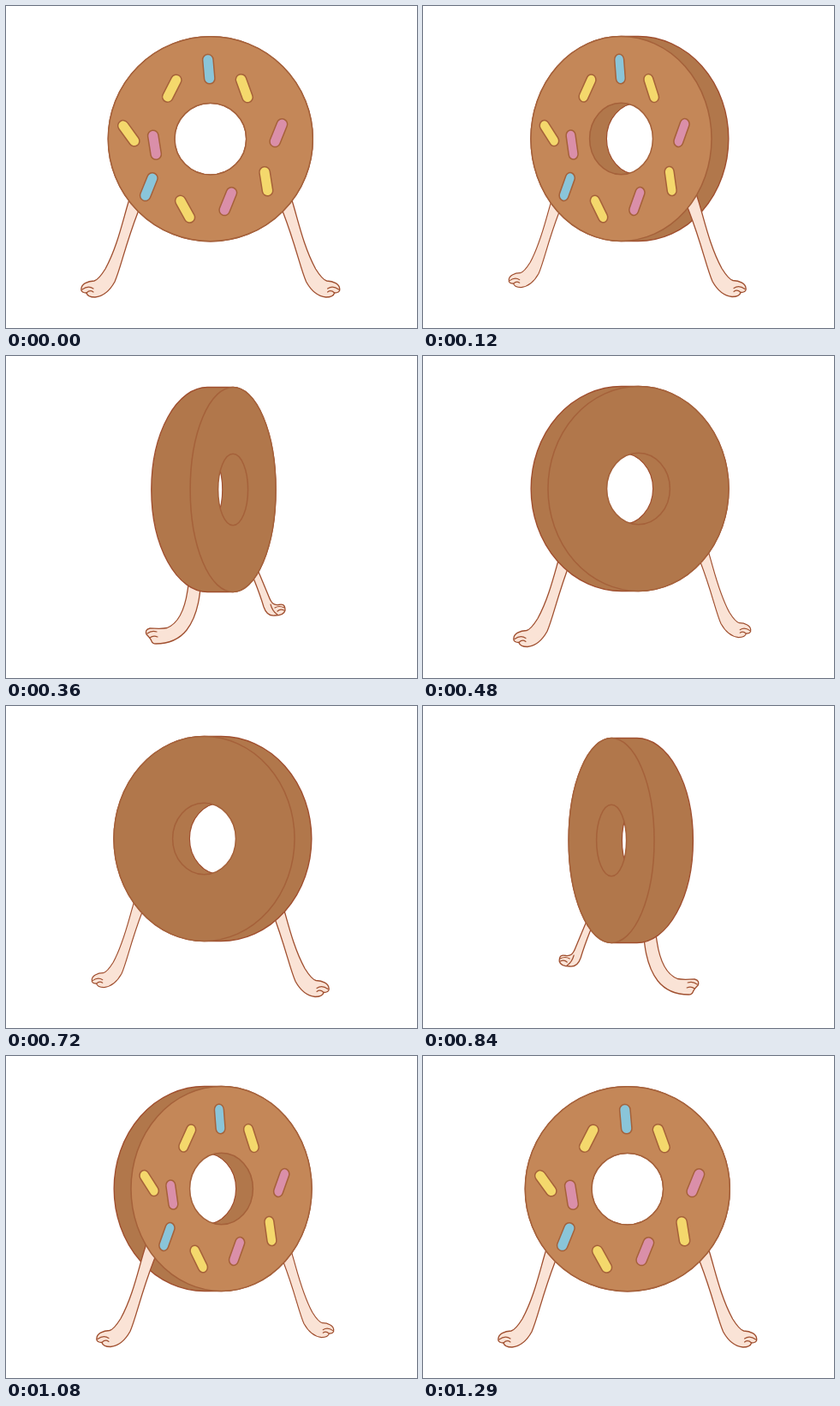
An HTML page with a canvas for the animation above (1320 ms loop, 480 by 376 pixels).

```html
<!DOCTYPE html>
<html lang="en">
<head>
<meta charset="utf-8">
<title>Turning donut</title>
<style>
  html, body { margin: 0; width: 100%; height: 100%; overflow: hidden; background: #fff; }
  canvas { display: block; }
</style>
</head>
<body>
<canvas id="stage" width="480" height="376"></canvas>
<script>
const ctx = document.getElementById('stage').getContext('2d');

const LOOP = 1320, STEP = 120, POSES = 10;
const R = 119.5, HOLE = 41.8;
const GLAZE = '#c48758', DOUGH = '#b1774b', SKIN = '#fae3d6';
const EDGE = '#a04f2f', LINE = '#a5613a';
const BLUE = '#8ac5d9', YELLOW = '#f4d86c', PINK = '#da8fa9';

// Offset from the donut centre, tilt in degrees, colour
const sprinkles = [
  [-2, -81.5, -5, BLUE], [-45, -59, 27, YELLOW], [39.5, -59, -20, YELLOW],
  [-95.5, -6.5, -36, YELLOW], [-65.3, 7, -9, PINK], [79.5, -7, 22, PINK],
  [-72, 56, 22, BLUE], [-29.7, 82, -29, YELLOW], [20.5, 73, 22, PINK],
  [65, 49.5, -9, YELLOW]
];

const limb = (outline, toes) => ({ outline: new Path2D(outline), toes: new Path2D(toes) });

const openLeg = limb(
  'M149 210L143 229C136 252 130 281 116 307C111 315 107 320 103 321C95 321 88 325 88 330' +
  'C87 334 91 335 94 335C95 339 100 340 104 340C114 339 122 331 127 322C134 306 139 280 154 241L162 220',
  'M89 331Q96 326 102 330M94 335Q98 331 102 334');
const nearLeg = limb(
  'M218 190L217.7 205C217 225 215 256 212 274C209 294 202 312 188 317.5C182 319 174 318 168 318' +
  'C163 319 163 322 164 325C167 328 169 330 170 333Q171 336 175 336C190 336 203 330 211 320' +
  'C224 303 228 280 229 238L229 190',
  'M165 324Q170 320 176 322M168 329Q172 326 177 328');
const farLeg = limb(
  'M286 232L297 257L307 281C310 289 313 291 318 290.5C324 289 326 291 326 297' +
  'C325 301 321 303 314 303C306 304 303 299 301 293C298 283 294 272 290 262L281 240',
  'M325 294Q319 291 314 294M325 297Q320 295 317 298M309 290Q311 298 317 302');

// width ratio of the visible disc and of the far one, distance between them
const FLAT = { axis: 238.8, cy: 155.2, w: 1, farW: 1, half: 0, depth: 0 };
const SLIGHT = { axis: 241.5, cy: 155, w: 0.883, farW: 0.883, half: 10, depth: 19.8 };
const SIDE = { axis: 242.6, cy: 156, w: 0.418, farW: 0.548, half: 22.5, depth: 29.8 };
const views = [FLAT, SLIGHT, SIDE, SIDE, SLIGHT];

function outline(color, width, path) {
  ctx.strokeStyle = color;
  ctx.lineWidth = width;
  path ? ctx.stroke(path) : ctx.stroke();
}

function drawLeg(leg, x = 0, y = 0, sx = 1, sy = 1) {
  ctx.save();
  ctx.translate(x, y);
  ctx.scale(sx, sy);
  ctx.fillStyle = SKIN;
  ctx.fill(leg.outline);
  outline(EDGE, 1.3, leg.outline);
  outline(EDGE, 1.2, leg.toes);
  ctx.restore();
}

function drawNear(view) {
  if (view === SIDE) drawLeg(nearLeg);
  else drawLeg(openLeg, view === SLIGHT ? 18 : 0, view === SLIGHT ? -0.5 : 0);
}

function drawFar(view) {
  if (view === SIDE) drawLeg(farLeg);
  else if (view === FLAT) drawLeg(openLeg, 2 * FLAT.axis, 0, -1);
  else drawLeg(openLeg, 461, 26, -0.89, 0.89);
}

function withFlip(view, flip, draw) {
  ctx.save();
  if (flip) {
    ctx.translate(2 * view.axis, view === SIDE ? 1 : 0);
    ctx.scale(-1, 1);
  }
  draw(view);
  ctx.restore();
}

function ring(cx, cy, r, w) {
  ctx.beginPath();
  ctx.ellipse(cx, cy, r * w, r, 0, 0, 2 * Math.PI);
}

function drawBody(view, cx, farX, cy, dir) {
  const q = Math.PI / 2, ccw = dir < 0;
  ctx.beginPath();
  ctx.ellipse(cx, cy, R * view.w, R, 0, -q, q, ccw);
  ctx.ellipse(farX, cy, R * view.farW, R, 0, q, -q, ccw);
  ctx.closePath();
  ctx.fillStyle = DOUGH;
  ctx.fill();
  outline(EDGE, 1.4);
}

function drawHole(view, cx, farX, cy) {
  ctx.save();
  ring(cx, cy, HOLE, view.w);
  ctx.fillStyle = DOUGH;
  ctx.fill();
  ctx.clip();
  ring(farX, cy, HOLE, view.w);
  ctx.fillStyle = '#fff';
  ctx.fill();
  outline(EDGE, 1.2);
  ctx.restore();
  ring(cx, cy, HOLE, view.w);
  outline(LINE, 1.5);
}

function drawSprinkle(cx, cy, w, [x, y, tilt, color]) {
  ctx.save();
  ctx.translate(cx, cy);
  ctx.scale(w, 1);
  ctx.translate(x, y);
  ctx.rotate(tilt * Math.PI / 180);
  ctx.beginPath();
  ctx.roundRect(-6.2, -17.2, 12.4, 34.4, 6.2);
  ctx.restore();
  ctx.fillStyle = color;
  ctx.fill();
  outline(LINE, 1.5);
}

function drawPose(i) {
  const view = views[i % 5];
  const back = i >= 3 && i <= 7;
  const flip = i % 5 === 1 || i % 5 === 2;
  const dir = flip ? -1 : 1;
  const cx = view.axis + dir * view.half;
  const farX = cx - dir * view.depth;
  const cy = view.cy + (flip && view === SIDE ? 1 : 0);
  const nearOnTop = !back && view !== FLAT;

  ctx.fillStyle = '#fff';
  ctx.fillRect(0, 0, 480, 376);

  withFlip(view, flip, drawFar);
  if (!nearOnTop) withFlip(view, flip, drawNear);
  drawBody(view, cx, farX, cy, dir);
  if (nearOnTop) withFlip(view, flip, drawNear);

  ring(cx, cy, R, view.w);
  ctx.fillStyle = back ? DOUGH : GLAZE;
  ctx.fill();
  outline(LINE, 1.5);
  drawHole(view, cx, farX, cy);
  if (back) return;
  // The topping drifts slightly as the disc turns away
  const topX = cx + (flip ? 2.4 * (1 - view.w) : 0);
  sprinkles.forEach(s => drawSprinkle(topX, cy, view.w, s));
}

ctx.lineJoin = ctx.lineCap = 'round';
const start = performance.now();

function tick() {
  const t = (performance.now() - start) % LOOP;
  drawPose(Math.floor(t / STEP) % POSES);
  requestAnimationFrame(tick);
}
tick();
</script>
</body>
</html>
```
